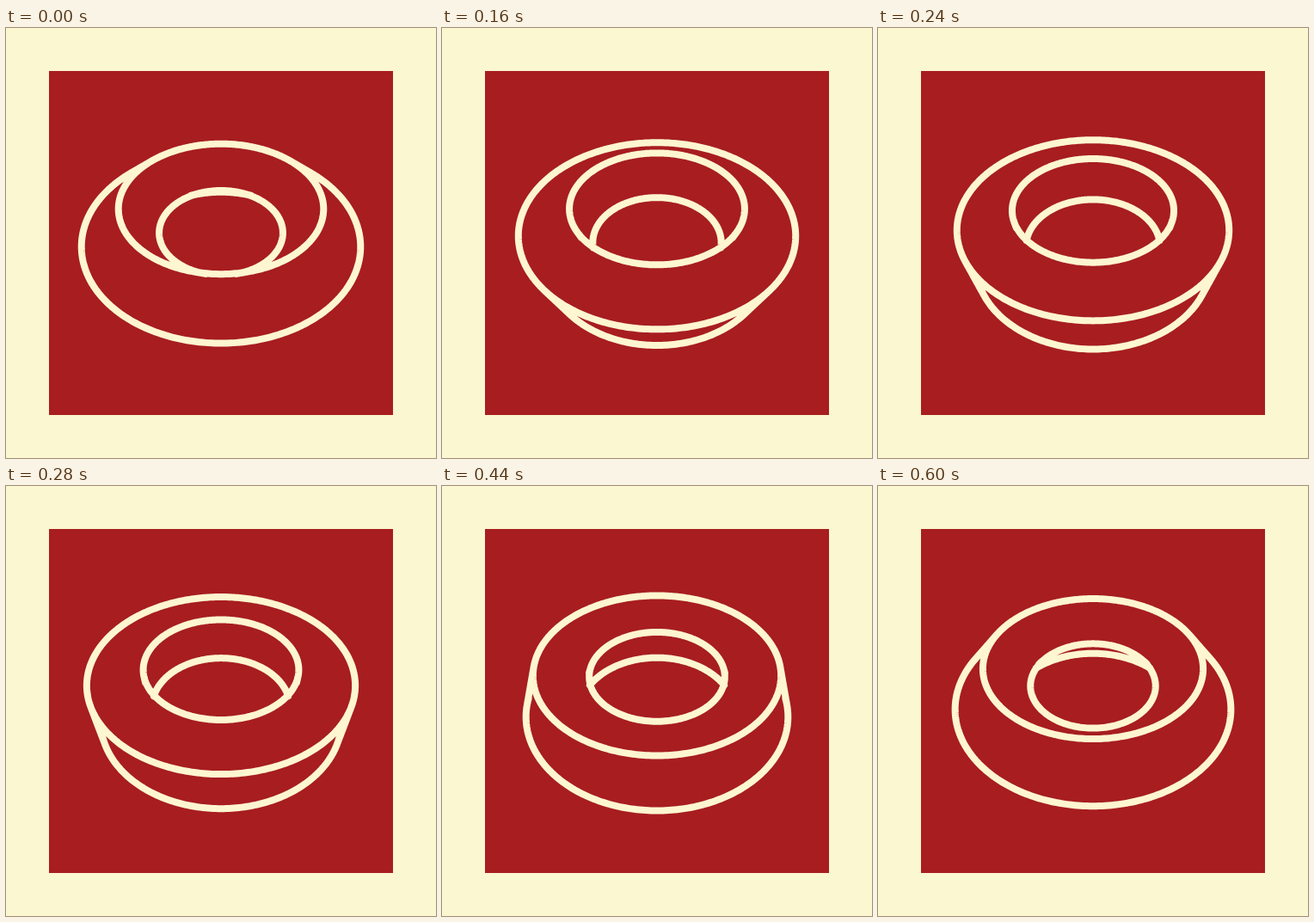
An HTML page that plays this animation: 500 by 500 pixels, repeating every 0.68 s.

```html
<!DOCTYPE html>
<html lang="en">
<head>
<meta charset="utf-8">
<title>Rolling square ring</title>
<style>
  html, body { margin: 0; width: 100%; height: 100%; overflow: hidden; background: #fbf7d0; }
  svg { display: block; width: 100%; height: 100%; }
</style>
</head>
<body>
<svg viewBox="0 0 500 500">
  <rect x="50" y="50" width="400" height="400" fill="#a71d20"/>
  <path id="lines" fill="none" stroke="#fdf6d0" stroke-width="8" stroke-linecap="round" stroke-linejoin="round"/>
</svg>
<script>
const LOOP = 680, STEP = 40, STEPS = LOOP / STEP;
const RING = 114.2;   // distance from the axis to the middle of the section
const CORNER = 42.5;  // distance from the middle of the section to its corners
const DISTANCE = 477, TILT = 42.5 * Math.PI / 180;
const CENTER_X = 250, CENTER_Y = 229.9;
const SIN = Math.sin(TILT), COS = Math.cos(TILT);
const EYE = [0, DISTANCE * SIN, DISTANCE * COS];
const lines = document.getElementById('lines');

const onRing = (radius, height, angle) =>
  [radius * Math.cos(angle), height, radius * Math.sin(angle)];

function project([x, y, z]) {
  const scale = DISTANCE / (DISTANCE - y * SIN - z * COS);
  return [CENTER_X + x * scale, CENTER_Y + (z * SIN - y * COS) * scale];
}

function isInside(x, y, z, rollCos, rollSin) {
  const q = Math.hypot(x, z) - RING;
  return Math.abs(q * rollCos + y * rollSin) + Math.abs(y * rollCos - q * rollSin) < CORNER - 0.6;
}

// March from the point towards the eye until the ray is above the solid.
function isVisible(point, rollCos, rollSin) {
  const ray = EYE.map((e, i) => e - point[i]);
  const length = Math.hypot(...ray);
  const [dx, dy, dz] = ray.map(v => v / length);
  let [x, y, z] = point;
  while (y <= CORNER) {
    if (isInside(x, y, z, rollCos, rollSin)) return false;
    x += dx * 1.5;
    y += dy * 1.5;
    z += dz * 1.5;
  }
  return true;
}

// The four edges of the solid, then the straight outlines of its conical faces.
function buildCurves(roll) {
  const edges = [0, 1, 2, 3].map(k => {
    const a = roll + k * Math.PI / 2;
    return { radius: RING + CORNER * Math.cos(a), height: CORNER * Math.sin(a) };
  });
  const curves = edges.map(({ radius, height }) => ({
    count: 360,
    at: u => onRing(radius, height, u * 2 * Math.PI)
  }));
  edges.forEach((from, k) => {
    const to = edges[(k + 1) % 4];
    const normal = roll + (k + 0.5) * Math.PI / 2;
    const nr = Math.cos(normal), nh = Math.sin(normal);
    const sine = (nr * RING + CORNER * Math.SQRT1_2 - nh * EYE[1]) / (nr * EYE[2]);
    if (!(Math.abs(sine) < 1)) return;
    const angle = Math.asin(sine);
    for (const side of [angle, Math.PI - angle]) {
      curves.push({
        count: 40,
        at: u => onRing(from.radius + (to.radius - from.radius) * u,
                        from.height + (to.height - from.height) * u, side)
      });
    }
  });
  return curves;
}

function draw(roll) {
  const rollCos = Math.cos(roll), rollSin = Math.sin(roll);
  let d = '';
  for (const { count, at } of buildCurves(roll)) {
    let drawing = false;
    for (let i = 0; i <= count; i++) {
      const point = at(i / count);
      const visible = isVisible(point, rollCos, rollSin);
      if (visible) {
        d += (drawing ? 'L' : 'M') + project(point).map(v => v.toFixed(2)).join(' ');
      }
      drawing = visible;
    }
  }
  lines.setAttribute('d', d);
}

const start = performance.now();
let shown = -1;

function update() {
  const time = (performance.now() - start) % LOOP;
  // The last pose is held for two steps.
  const step = Math.min(Math.floor(time / STEP), STEPS - 2);
  if (step !== shown) {
    shown = step;
    draw((step + 1) / STEPS * Math.PI / 2);
  }
  requestAnimationFrame(update);
}
update();
</script>
</body>
</html>
```
